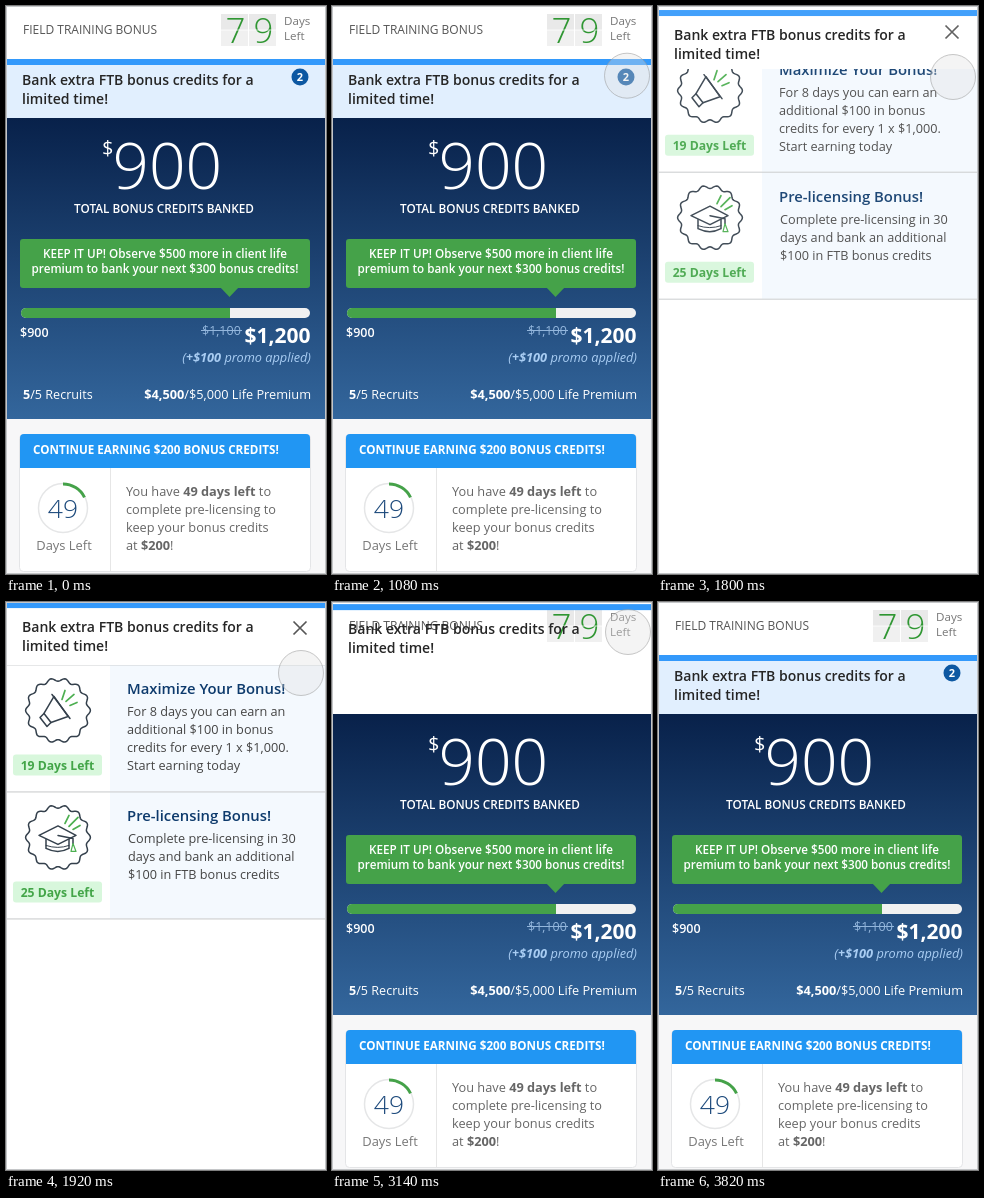
These frames come from a looping animation (320 px wide and 568 px high, 4420 ms). An HTML page:

```html
<!DOCTYPE html>
<html lang="en">
<head>
<meta charset="utf-8">
<title>Bonus credits</title>
<style>
  html, body { margin: 0; width: 100%; height: 100%; overflow: hidden; background: #fff; }
  svg { display: block; width: 320px; height: 568px; font-family: "Open Sans", sans-serif; }
  text { white-space: pre; }
</style>
</head>
<body>
<svg id="stage" viewBox="0 0 320 568"></svg>
<script>
const LOOP = 4420;
const svg = document.getElementById('stage');

const text = (x, y, size, fill, str, weight = 400, anchor = 'start', more = '') =>
  `<text x="${x}" y="${y}" font-size="${size}" fill="${fill}" font-weight="${weight}" text-anchor="${anchor}" ${more}>${str}</text>`;
const lines = (x, y, step, size, fill, rows, weight, anchor) =>
  rows.map((row, i) => text(x, y + i * step, size, fill, row, weight, anchor)).join('');
const rect = (x, y, w, h, fill, r = 0, more = '') =>
  `<rect x="${x}" y="${y}" width="${w}" height="${h}" fill="${fill}" rx="${r}" ${more}/>`;
const path = (d, stroke, width, more = '') =>
  `<path d="${d}" fill="none" stroke="${stroke}" stroke-width="${width}" ${more}/>`;
const bold = str => `<tspan font-weight="700">${str}</tspan>`;

// Wavy round seal behind each offer icon
function seal(cx, cy) {
  let d = '';
  for (let i = 0; i <= 180; i++) {
    const a = i * Math.PI / 90, r = 30.8 - 1.6 * Math.cos(14 * a);
    d += `${i ? 'L' : 'M'}${(cx + r * Math.sin(a)).toFixed(2)} ${(cy - r * Math.cos(a)).toFixed(2)}`;
  }
  return path(d + 'Z', '#34404c', 1.5);
}

function digit(x, n) {
  return rect(x, 8, 27, 32, '#f0f0f0') + rect(x, 8, 27, 16, '#e9e9e9') +
    text(x + 14.5, 37, 35, '#2f9632', n, 300, 'middle') + rect(x, 23.5, 27, 1, '#fff', 0, 'opacity=".7"');
}

function offer(y, days, title, x, body, icon) {
  return rect(1, y, 103, 127, '#fff') + rect(104, y, 215, 127, '#f4f9fe') +
    rect(1, y, 318, 1, '#c6c8ca') + seal(52, y + 46) +
    `<g stroke-linejoin="round" stroke-linecap="round">${icon}</g>` +
    rect(7, y + 90, 89, 21, '#d8f7dc', 3) +
    text(51.5, y + 105.5, 12.2, '#43a548', days + ' Days Left', 700, 'middle') +
    text(121, y + 30, 14.85, '#0d3a6c', title, 600) +
    lines(x, y + 52, 18, 12.7, '#454545', body);
}

const horn = path('M48 95L62 115L45 121L38 112Z', '#34404c', 1.5) +
  path('M46 93L64 117M38 112L34 116L41 125L45 121', '#34404c', 1.5) +
  path('M56 98L59 89M60 100L68 93M64 104L71 101', '#4caf50', 1.7);
const cap = path('M33 234L52 224.500L70 234L52 243Z', '#34404c', 1.5) +
  path('M40 238V247Q52 253 63 247V238M52 234L67 237V242', '#34404c', 1.5) +
  path('M40 244Q52 248 63 244', '#34404c', 1) +
  path('M67 242L65 250H70Z', '#4caf50', 1.2) +
  path('M59 222L63 214M63 225L72 216M67 228L74 224', '#4caf50', 1.7);

const home =
  text(17, 28, 12, '#555', 'FIELD TRAINING BONUS') +
  digit(215, 7) + digit(243, 9) +
  lines(278, 19, 15, 11.6, '#777', ['Days', 'Left']) +
  rect(0, 112, 320, 301, 'url(#night)') +
  text(96, 149, 20, '#fff', '$') +
  text(106.5, 183, 64, '#fff', '900', 300) +
  text(158, 206.5, 11.75, '#fff', 'TOTAL BONUS CREDITS BANKED', 600, 'middle') +
  rect(14, 233, 290, 49, '#45a249', 3) +
  '<path d="M214 281H233L223.500 291Z" fill="#45a249"/>' +
  lines(159, 252, 15, 11.7, '#fff',
    ['KEEP IT UP! Observe $500 more in client life', 'premium to bank your next $300 bonus credits!'], 600, 'middle') +
  rect(15, 302, 289, 10, '#f1f1f1', 5) +
  '<path d="M224 302H20a5 5 0 0 0 0 10H224Z" fill="#45a249"/>' +
  text(14, 330.5, 12.5, '#fff', '$900', 600) +
  text(196, 329, 12.5, '#93b6dc', '$1,100') + rect(195, 324, 41, 1, '#93b6dc') +
  text(304.5, 337, 21, '#fff', '$1,200', 700, 'end') +
  text(305, 355.5, 12.75, '#a9cdf3', `(${bold('+$100')} promo applied)`, 400, 'end', 'font-style="italic"') +
  text(17, 393, 12.6, '#fff', bold('5') + '/5 Recruits') +
  text(305, 393, 12.75, '#fff', bold('$4,500') + '/$5,000 Life Premium', 400, 'end') +
  rect(0, 413, 320, 155, '#f7f7f8') +
  rect(13.5, 428.5, 291, 137, '#fff', 4, 'stroke="#e4e5e7"') +
  '<path d="M14 462V432a4 4 0 0 1 4-4H300a4 4 0 0 1 4 4V462Z" fill="#2196f3"/>' +
  text(27, 448, 11.65, '#fff', 'CONTINUE EARNING $200 BONUS CREDITS!', 700) +
  rect(104, 462, 1, 103, '#e6e6e6') +
  '<circle cx="57" cy="502" r="24.500" fill="none" stroke="#e5e6e7" stroke-width="1.500"/>' +
  path('M57 478A24 24 0 0 1 78.500 491.300', '#45a249', 3) +
  text(57, 511.5, 26.5, '#1d4a7c', '49', 300, 'middle') +
  text(58, 544, 12.9, '#777', 'Days Left', 400, 'middle') +
  lines(120, 489.5, 18, 12.75, '#666', [`You have ${bold('49 days left')} to`,
    'complete pre-licensing to', 'keep your bonus credits', `at ${bold('$200')}!`]);

const offers =
  offer(63, 19, 'Maximize Your Bonus!', 121,
    ['For 8 days you can earn an', 'additional $100 in bonus', 'credits for every 1 x $1,000.', 'Start earning today'], horn) +
  offer(190, 25, 'Pre-licensing Bonus!', 122,
    ['Complete pre-licensing in 30', 'days and bank an additional', '$100 in FTB bonus credits'], cap) +
  rect(1, 317, 318, 1, '#c6c8ca');

svg.innerHTML = `
  <defs>
    <linearGradient id="night" x2="0" y2="1">
      <stop stop-color="#08214a"/><stop offset="1" stop-color="#33669c"/>
    </linearGradient>
    <clipPath id="below"><rect y="63" width="320" height="505"/></clipPath>
  </defs>
  ${rect(0, 0, 320, 568, '#fff')}
  <g id="home">${home}</g>
  <g clip-path="url(#below)"><g id="list">${offers}</g></g>
  <g id="tint">${rect(0, 59, 320, 53, '#e1effe')}</g>
  <g id="close">${path('M287.500 19.500L300.500 32.500M300.500 19.500L287.500 32.500', '#555', 1.7)}</g>
  <g id="bar">${rect(0, 0, 320, 6, '#3399fb')}</g>
  <g id="badge"><circle cx="294" cy="71" r="8.500" fill="#0d58a2"/>${text(294, 75, 11, '#fff', '2', 700, 'middle')}</g>
  <g id="head">${lines(16, 79, 19, 14.05, '#262626', ['Bank extra FTB bonus credits for a', 'limited time!'], 600)}</g>
  ${rect(0.5, 0.5, 319, 567, 'none', 0, 'stroke="#c4c6c8"')}
  <circle id="touch" r="22.500" fill="#dedede" fill-opacity=".35" stroke="#999" stroke-opacity=".55"/>`;

const part = {};
for (const id of ['home', 'list', 'tint', 'close', 'bar', 'badge', 'head', 'touch'])
  part[id] = document.getElementById(id);

const mix = (a, b, k) => a + (b - a) * k;
const span = (t, from, len) => Math.min(1, Math.max(0, (t - from) / len));

// cubic-bezier(.2, 0, 0, 1)
function ease(x) {
  let lo = 0, hi = 1, s = x;
  for (let i = 0; i < 24; i++) {
    s = (lo + hi) / 2;
    if (0.6 * s * (1 - s) ** 2 + s ** 3 < x) lo = s; else hi = s;
  }
  return x <= 0 ? 0 : x >= 1 ? 1 : s * s * (3 - 2 * s);
}

function place(id, x, y, alpha = 1) {
  part[id].setAttribute('transform', `translate(${x.toFixed(2)} ${y.toFixed(2)})`);
  part[id].setAttribute('opacity', alpha.toFixed(3));
}

function touch(t) {
  if (t < 2080) {
    const k = ease(span(t, 240, 1040));
    return [mix(297, 295, k), mix(-24, 71, k)];
  }
  const out = span(t, 3500, 320) ** 3;
  const x = 295 - span(t, 2080, 220) + 2 * span(t, 2360, 240) - out;
  const y = mix(71, 30, ease(span(t, 2080, 580)));
  return [x, mix(y, -24, out)];
}

function draw(t) {
  const opened = t >= 1580 && t < 3140;
  const k = t < 3140 ? ease(span(t, 1594, 352)) : 1 - ease(span(t, 3115, 450));
  place('home', 0, 0, opened ? 0 : 1);
  place('list', 0, -320 * (1 - k), opened ? k : 0);
  place('close', 0, 0, opened ? k : 0);
  place('bar', 0, mix(53, 0, k), opened ? k : 1);
  place('tint', 0, -132 * k, 1 - k);
  place('badge', 0, -129 * k, 1 - k);
  place('head', 0, -49 * k);
  place('touch', ...touch(t));
}

function tick(now) {
  draw(now % LOOP);
  requestAnimationFrame(tick);
}
draw(0);
requestAnimationFrame(tick);
</script>
</body>
</html>
```
